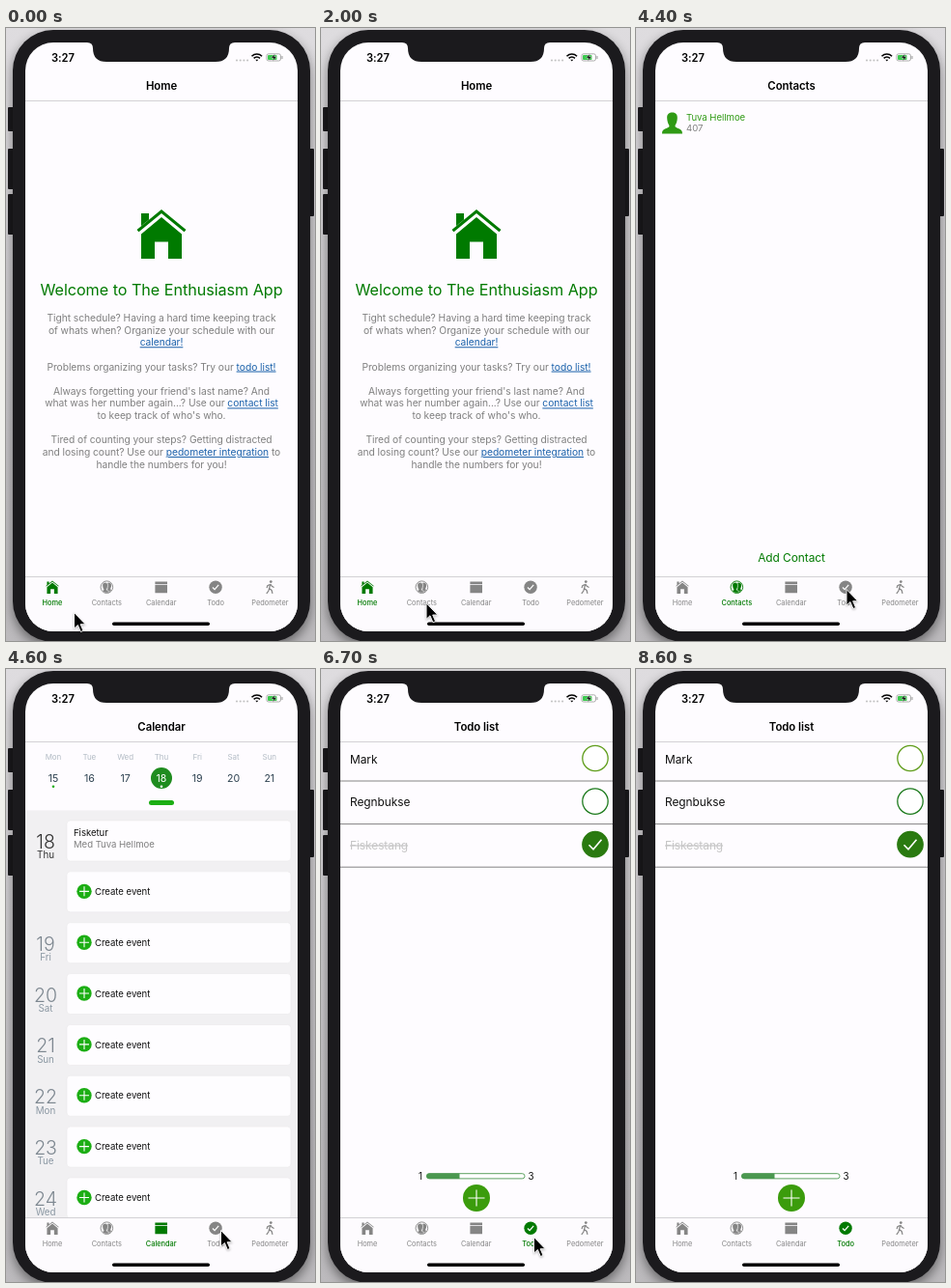
An HTML page that plays this animation: 320x635 px, repeating every 8700 ms.

```html
<!DOCTYPE html>
<html lang="en">
<head>
<meta charset="utf-8">
<title>Phone app tour</title>
<style>
html, body { margin: 0; width: 100%; height: 100%; overflow: hidden; background: linear-gradient(#dedcdf, #bcbabd); }
svg { display: block; width: 320px; height: 635px; font-family: Inter, Roboto, sans-serif; letter-spacing: -.003em; }
.mid { text-anchor: middle; }
.link { fill: #1c62ab; text-decoration: underline; }
.tab { color: #858585; fill: currentColor; font-size: 7.4px; letter-spacing: 0; }
.tab.on { color: #007a00; font-weight: 500; }
</style>
</head>
<body>
<svg viewBox="0 0 320 635">
  <defs>
    <clipPath id="face"><circle r="5.6"/></clipPath>
    <clipPath id="glass"><rect x="20" y="15" width="282" height="610" rx="29"/></clipPath>
    <g id="house">
      <path d="M0-25.5 25.5-4.5 23.5-2.2 0-21.5-23.5-2.2-25.5-4.5ZM-21-21.5h8v6.5l-8 6.6z"/>
      <path d="M0-17.5 21 0V25.5H7V8H-7V25.5H-21V0Z"/>
    </g>
    <path id="person" d="M0-11C-4-11-5.6-8.5-5.3-5-5 0-3.5 1-3 3-3 6-11 4.5-10.5 11H10.5C11 4.5 3 6 3 3 3.5 1 5 0 5.3-5 5.6-8.5 4-11 0-11Z"/>
    <path id="check" d="M-6.5 .5-2 5 6.5-5" fill="none" stroke="#fff"/>
  </defs>
  <g fill="#1b1a1d">
    <path d="M2 83q0-1 1-1h6v25H3q-1 0-1-1zM2 126q0-1 1-1h6v42H3q-1 0-1-1zM2 173q0-1 1-1h6v42H3q-1 0-1-1zM312 125h6q1 0 1 1v68q0 1-1 1h-6z"/>
    <rect x="7" y="2" width="308" height="634" rx="42" style="filter:drop-shadow(0 5px 6px #0007)"/>
  </g>
  <g clip-path="url(#glass)">
    <path fill="#fefcff" d="M20 15H302V625H20Z"/>
    <g id="pages"></g>
    <path fill="#fdfbfe" d="M20 568H302V625H20Z"/>
    <path stroke="#d3d2d5" d="M20 75.5H302M20 568.5H302"/>
    <g id="tabs"></g>
    <rect x="110" y="615.5" width="101" height="3.4" rx="1.7"/>
  </g>
  <path fill="#1b1a1d" d="M84 14H237V15Q231 15 231 21 231 35 217 35H104Q90 35 90 21 90 15 84 15Z"/>
  <text class="mid" x="59" y="34.7" font-size="11.2" font-weight="600">3:27</text>
  <text class="mid" id="title" x="161" y="64" font-size="11.4" font-weight="600"></text>
  <path d="M239 33.5h12" stroke="#c4c4c4" stroke-width="2.2" stroke-linecap="round" stroke-dasharray="0 3.7"/>
  <g fill="none" stroke="#000" stroke-width="1.5">
    <path d="M254.5 29.2a7.6 7.6 0 0 1 10.6 0M256.6 31.4a4.6 4.6 0 0 1 6.4 0"/>
    <path d="M258.3 32.8h3L259.8 34.4Z" fill="#000" stroke="none"/>
  </g>
  <rect x="269.9" y="26.8" width="14.6" height="7.2" rx="2" fill="#fff" stroke="#999" stroke-width=".8"/>
  <path d="M286 29v3" stroke="#999"/>
  <rect x="271" y="27.9" width="9.5" height="5" rx="1" fill="#3cc94f"/>
  <path d="M278.8 26.5 274.5 31h2.6l-1 3.4 4.2-4.6h-2.6z" stroke="#fff" stroke-width=".4"/>
  <path id="cursor" d="M0 0V16.5L3.9 13 6.9 20 9.5 18.9 6.6 12.2H11.7Z" stroke="#fff" stroke-width=".9" style="filter:drop-shadow(0 1px 1px #0004)"/>
</svg>
<script>
const $ = id => document.getElementById(id);
const text = (x, y, size, fill, str, more = '') =>
  `<text x="${x}" y="${y}" font-size="${size}" fill="${fill}" ${more}>${str}</text>`;
const MID = 'class="mid"', GREEN = '#007a00';
const link = str => `<tspan class="link">${str}</tspan>`;
const plus = (x, y, r, arm, fill) =>
  `<circle cx="${x}" cy="${y}" r="${r}" fill="${fill}"/>
   <path d="M${x - arm} ${y}h${2 * arm}M${x} ${y - arm}v${2 * arm}" stroke="#fff" stroke-width="1.1"/>`;

function homePage() {
  // An empty entry is a blank line between paragraphs.
  const lines = [
    'Tight schedule? Having a hard time keeping track',
    'of whats when? Organize your schedule with our',
    link('calendar!'), '',
    `Problems organizing your tasks? Try our ${link('todo list!')}`, '',
    "Always forgetting your friend's last name? And",
    `what was her number again...? Use our ${link('contact list')}`,
    "to keep track of who's who.", '',
    'Tired of counting your steps? Getting distracted',
    `and losing count? Use our ${link('pedometer integration')} to`,
    'handle the numbers for you!'
  ];
  return `<use href="#house" x="161" y="213.5" fill="${GREEN}"/>` +
    text(161, 276.7, 16.2, GREEN, 'Welcome to The Enthusiasm App', MID) +
    lines.map((s, i) => s && text(161, 304 + 12.63 * i, 10.25, '#7f7f7f', s, MID)).join('');
}

const FRIEND = 'Tuva Hellmoe';

function contactsPage() {
  return '<use href="#person" x="37.5" y="98.5" fill="#2f9a14"/>' +
    text(52, 96, 9.6, '#2f9a14', FRIEND) +
    text(52, 107.4, 9.6, '#7f7f7f', '407') +
    text(161, 553, 11.9, GREEN, 'Add Contact', MID);
}

function calendarPage() {
  const days = ['Mon', 'Tue', 'Wed', 'Thu', 'Fri', 'Sat', 'Sun'];
  let out = '<path fill="#f1f0f2" d="M20 146.5H302V568H20Z"/><circle cx="161" cy="113" r="11" fill="#1f8c1f"/>';
  days.forEach((day, i) => {
    const x = 49 + 37.3 * i;
    out += text(x, 93.8, 8, '#b3bcc5', day, MID) +
      text(x, 116.8, 10.6, i == 3 ? '#fff' : '#2d4150', 15 + i, MID);
  });
  out += `<circle cx="49" cy="121.7" r="1.3" fill="#1cae14"/><circle cx="161" cy="121.7" r="1.3" fill="#fff"/>
    <rect x="148" y="136" width="26" height="5" rx="2.5" fill="#1cae14"/>`;
  for (let i = 0; i < 8; i++) {
    const y = 157 + 52.85 * i;
    out += `<rect x="63" y="${y}" width="232" height="42" rx="3.5" fill="#fefdff" stroke="#e9e8ea" stroke-width=".6"/>`;
    out += i
      ? plus(81, y + 20.5, 7.7, 5, '#1cae14') + text(92, y + 24.2, 9.6, '#111', 'Create event')
      : text(70, y + 16, 9.6, '#111', 'Fisketur') + text(70, y + 28, 9.6, '#7f7f7f', 'Med ' + FRIEND);
    if (i == 1) continue;
    const n = i ? i - 1 : 0;
    out += text(41, y + 29, 19.5, i ? '#7d8790' : '#333', 18 + n, MID + ' font-weight="300"') +
      text(41, y + 39.3, 9.8, i ? '#8a97a2' : '#333', days[(3 + n) % 7], MID);
  }
  return out;
}

function todoPage() {
  const rows = [['Mark', '#5f9d1a'], ['Regnbukse', '#1c7a1c'], ['Fiskestang', '#2a7a10']];
  return rows.map(([name, color], i) => {
    const y = 92.5 + 44.6 * i, done = i == 2;
    return text(30, y + 5.3, 11.9, done ? '#c6c6c6' : '#111', name, done ? 'text-decoration="line-through"' : '') +
      `<path d="M20 ${y + 23.5}H302" stroke="#777" stroke-width=".9"/>
       <circle cx="284" cy="${y}" r="13.2" fill="${done ? color : '#fff'}" stroke="${color}" stroke-width="1.3"/>` +
      (done ? `<use href="#check" x="284" y="${y}" stroke-width="1.6"/>` : '');
  }).join('') +
    text(103, 528.6, 9.8, '#111', 1, MID) + text(217.5, 528.6, 9.8, '#111', 3, MID) +
    `<rect x="109.5" y="522.7" width="101.5" height="5.2" rx="2.6" fill="#fff" stroke="#4b9850" stroke-width=".9"/>
     <path d="M143.5 522.5H112a2.8 2.8 0 0 0 0 5.6H143.5Z" fill="#4b9850"/>` +
    plus(161, 548, 14, 8.5, '#3b9c0c');
}

const icons = {
  Home: '<use href="#house" transform="scale(.265)"/>',
  Contacts: `<circle r="6.3" fill="none" stroke="currentColor" stroke-width=".9"/>
    <g clip-path="url(#face)"><use href="#person" transform="translate(2.4 .3) scale(.46)"/>
    <use href="#person" transform="translate(-1.7 1) scale(.54)" stroke="#fff" stroke-width="1.2"/></g>`,
  Calendar: '<path d="M-6.3-5.8H6.3V-3.2H-6.3ZM-6.3-2.5H6.3V6H-6.3Z"/>',
  Todo: '<circle r="6.7"/><use href="#check" transform="scale(.48)" stroke-width="2.6"/>',
  Pedometer: `<circle cx=".9" cy="-5.6" r="1.4"/>
    <path d="M.3-3-.8 1.3 1.7 3.2 2.6 6.7M-.8 1.3-1.5 3.8-3.6 6.7M.3-3-2.6-1.6-3.3 1M.5-3 2-.8 4.2 .3" fill="none" stroke="currentColor" stroke-width="1.2"/>`
};

$('pages').innerHTML = [homePage, contactsPage, calendarPage, todoPage].map(page => `<g>${page()}</g>`).join('');
$('tabs').innerHTML = Object.entries(icons).map(([name, icon], i) =>
  `<g class="tab" transform="translate(${48 + 56.35 * i} 579.2)">${icon}<text class="mid" y="19.3">${name}</text></g>`).join('');

const LOOP = 8700, STEP = 100;
const titles = ['Home', 'Contacts', 'Calendar', 'Todo list'];
const starts = [0, 2500, 4500, 6200];
// Pointer stops: time, x, y
const stops = [
  [0, 70.5, 605.5], [750, 100, 582.5], [1850, 100, 582.5], [2100, 114, 603], [2600, 161.5, 578.5],
  [3850, 161.5, 578.5], [4350, 217.5, 581.5], [4600, 222.5, 581.5], [5700, 222.5, 581.5],
  [6200, 220.5, 588.5], [6700, 220.5, 588.5], [7600, 312, 642], [LOOP, 312, 642]
];

function pointer(t) {
  const i = stops.findIndex(s => s[0] > t);
  const [t0, x0, y0] = stops[i - 1], [t1, x1, y1] = stops[i];
  const p = (t - t0) / (t1 - t0), e = p * p * (3 - 2 * p);
  return [x0 + (x1 - x0) * e, y0 + (y1 - y0) * e];
}

function draw(now) {
  const t = Math.floor(now % LOOP / STEP) * STEP;
  const page = starts.filter(s => s <= t).length - 1;
  [...$('pages').children].forEach((g, i) => g.style.display = i == page ? '' : 'none');
  [...$('tabs').children].forEach((g, i) => g.classList.toggle('on', i == page));
  $('title').textContent = titles[page];
  $('cursor').setAttribute('transform', `translate(${pointer(t)})`);
  requestAnimationFrame(draw);
}
draw(0);
</script>
</body>
</html>
```
